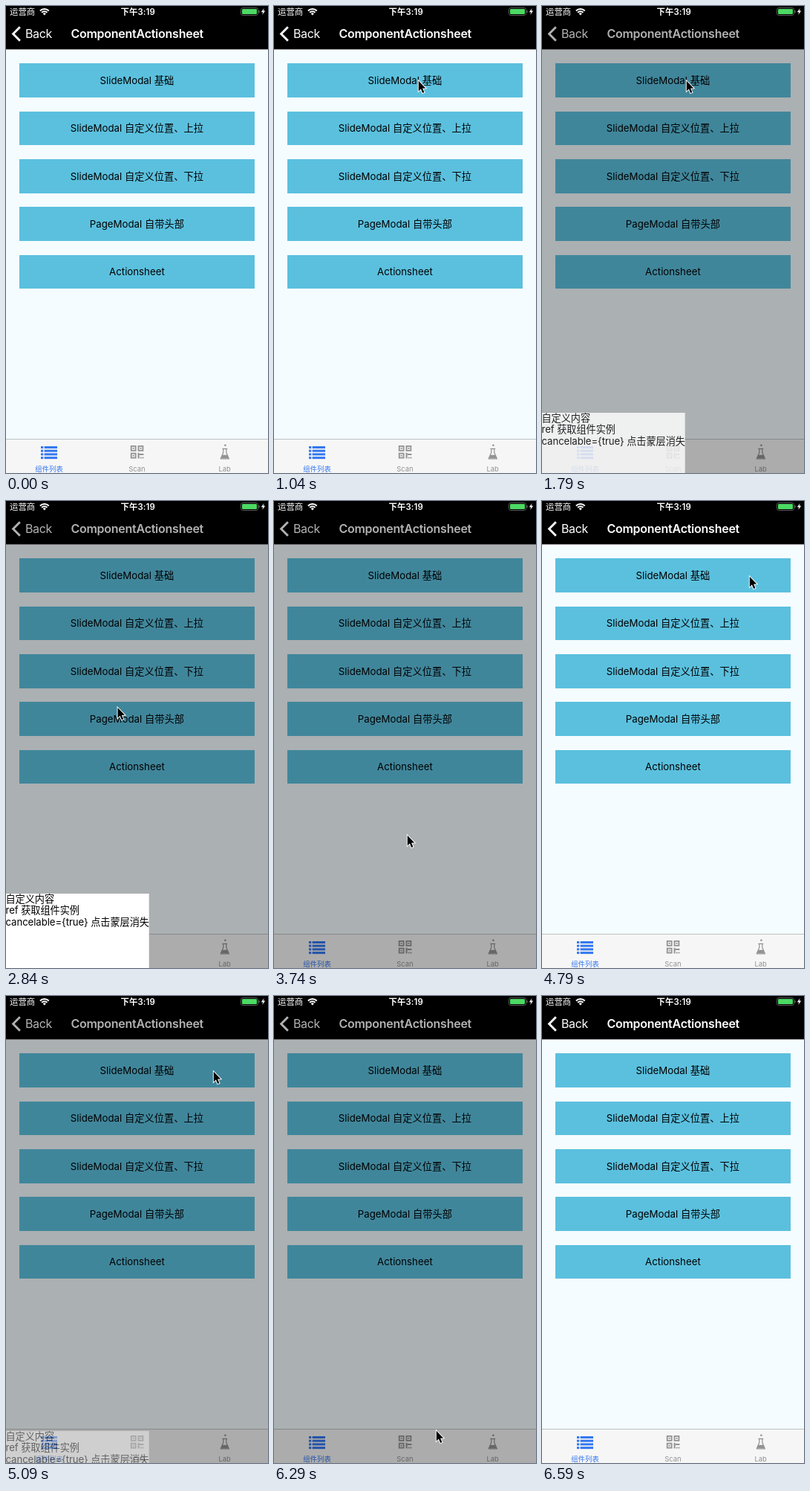
An HTML page with a canvas that plays this animation: 353 px wide and 628 px high, repeating every 7.04 s.

```html
<!DOCTYPE html>
<html lang="zh">
<head>
<meta charset="utf-8">
<title>Action sheet demo</title>
<style>
  html, body { margin: 0; width: 100%; height: 100%; overflow: hidden; background: #000; }
  canvas { display: block; width: 353px; height: 628px; }
</style>
</head>
<body>
<canvas id="stage"></canvas>
<script>
const W = 353, H = 628, LOOP = 7040, STEP = 150;
const SHEET_W = 192.7, SHEET_H = 100;
const FONT = 'Inter, "Noto Sans CJK SC", "Noto Sans CJK", sans-serif';
const ratio = window.devicePixelRatio || 1;

const buttons = [
  'SlideModal 基础',
  'SlideModal 自定义位置、上拉',
  'SlideModal 自定义位置、下拉',
  'PageModal 自带头部',
  'Actionsheet'
];
const sheetLines = ['自定义内容', 'ref 获取组件实例', 'cancelable={true} 点击蒙层消失'];

// Sheet slides in at open and out at close; the backdrop lingers
const sessions = [{ open: 1648, close: 3437 }, { open: 5015, close: 6030 }];
const SLIDE = 175, LINGER = 405;

// Pointer stops, joined by curved moves
const entry = [3, 249], firstTap = [195, 100], dismiss = [180, 449];
const secondTap = [280, 101], lastTap = [219, 584], exit = [300, 640];
const linear = u => u;
const easeOut = u => 1 - (1 - u) ** 2;
const moves = [
  { start: 300, end: 1040, from: entry, bend: [225, 80], to: firstTap, ease: linear },
  { start: 2540, end: 3140, from: firstTap, bend: [114, 280], to: dismiss, ease: linear },
  { start: 3840, end: 4790, from: dismiss, bend: [214, 275], to: secondTap, ease: easeOut },
  { start: 5240, end: 5840, from: secondTap, bend: [275, 400], to: lastTap, ease: easeOut },
  { start: 6290, end: 6590, from: lastTap, bend: [258, 612], to: exit, ease: linear }
];

const clamp = v => Math.max(0, Math.min(1, v));

function surface(el, w, h) {
  el.width = Math.round(w * ratio);
  el.height = Math.round(h * ratio);
  const pen = el.getContext('2d');
  pen.setTransform(ratio, 0, 0, ratio, 0, 0);
  return pen;
}

const stage = surface(document.getElementById('stage'), W, H);
const sheet = surface(document.createElement('canvas'), SHEET_W, SHEET_H);
let ctx = stage;

function rect(x, y, w, h, color) {
  ctx.fillStyle = color;
  ctx.fillRect(x, y, w, h);
}

function text(str, x, y, size, color, { weight = 400, align = 'left', spacing = 0 } = {}) {
  ctx.font = `${weight} ${size}px ${FONT}`;
  ctx.letterSpacing = spacing + 'px';
  ctx.textAlign = align;
  ctx.fillStyle = color;
  ctx.fillText(str, x, y);
}

function trace(points, closed) {
  ctx.beginPath();
  points.forEach(([x, y]) => ctx.lineTo(x, y));
  if (closed) ctx.closePath();
}

function stroke(color, width) {
  ctx.strokeStyle = color;
  ctx.lineWidth = width;
  ctx.stroke();
}

function fill(color) {
  ctx.fillStyle = color;
  ctx.fill();
}

function wifiIcon(cx, cy) {
  const a = -Math.PI * 0.75, b = -Math.PI * 0.25;
  ctx.beginPath();
  ctx.moveTo(cx, cy);
  ctx.arc(cx, cy, 3, a, b);
  fill('#fff');
  for (const r of [5.2, 8.4]) {
    ctx.beginPath();
    ctx.arc(cx, cy, r, a, b);
    stroke('#fff', 1.9);
  }
}

function batteryIcon(x, y) {
  ctx.beginPath();
  ctx.roundRect(x, y, 23, 10, 2.6);
  stroke('#666', 0.9);
  ctx.beginPath();
  ctx.roundRect(x + 1.5, y + 1.5, 20, 7, 1.3);
  fill('#4cd964');
  rect(x + 24, y + 3.3, 1.2, 3.4, '#666');
}

function drawStatus() {
  text('运营商', 5, 12, 11.4, '#fff');
  text('下午3:19', 177.7, 12, 11.4, '#fff', { weight: 600, align: 'center', spacing: 0.1 });
  wifiIcon(51.8, 12.4);
  batteryIcon(316.5, 2.5);
  trace([[347.6, 3], [343.8, 8.2], [346.3, 8.2], [345.2, 12], [349.2, 6.6], [346.7, 6.6]], true);
  fill('#fff');
}

function drawHeader() {
  rect(0, 0, W, 58, '#000');
  rect(0, 58, W, 1, '#a7a7aa');
  ctx.lineJoin = 'miter';
  trace([[18.8, 28.2], [9.6, 37.5], [18.8, 46.8]]);
  stroke('#fff', 2.9);
  text('Back', 26, 43.4, 16, '#fff', { spacing: -0.4 });
  text('ComponentActionsheet', 176.7, 43.4, 16, '#fff',
    { weight: 600, align: 'center', spacing: -0.25 });
}

function drawButtons() {
  buttons.forEach((label, i) => {
    const y = 77.4 + i * 64.32;
    const top = Math.round(y), bottom = Math.round(y + 45.5);
    rect(18, top, 317, bottom - top, '#5bc0de');
    text(label, 176.4, Math.round(y + 27.6), 13.25, '#000', { align: 'center' });
  });
}

function listIcon(x, y, color) {
  for (let i = 0; i < 4; i++) {
    rect(x, y + i * 4.7, 3.2, 3, color);
    rect(x + 4.6, y + i * 4.7, 17.4, 3, color);
  }
}

function scanIcon(x, y, color) {
  for (const [dx, dy] of [[0, 0], [9.8, 0], [0, 9.8]]) {
    ctx.beginPath();
    ctx.rect(x + dx + 0.9, y + dy + 0.9, 5.9, 5.9);
    stroke(color, 1.8);
    rect(x + dx + 2.9, y + dy + 2.9, 1.9, 1.9, color);
  }
  rect(x + 9.8, y + 9.8, 2, 7.6, color);
  rect(x + 11.8, y + 11, 5.8, 2, color);
  for (const dx of [13, 15.8]) rect(x + dx, y + 15.6, 1.8, 1.8, color);
}

function flaskIcon(cx, color) {
  ctx.lineJoin = 'round';
  trace([[cx - 2, 596], [cx - 2, 600.5], [cx - 5.6, 608.8], [cx + 5.6, 608.8],
    [cx + 2, 600.5], [cx + 2, 596]]);
  stroke(color, 1.2);
  trace([[cx - 3.4, 603.8], [cx + 3.4, 603.8], [cx + 5, 608], [cx - 5, 608]], true);
  fill(color);
  rect(cx - 3.4, 594.8, 6.8, 1.3, color);
  ctx.beginPath();
  ctx.arc(cx + 0.6, 590.8, 1.3, 0, Math.PI * 2);
  fill(color);
}

function drawTabs() {
  const blue = '#3478f0', gray = '#929292';
  rect(0, 582, W, 46, '#f6f6f6');
  rect(0, 582, W, 1, '#bdc3c5');
  listIcon(47, 592, blue);
  scanIcon(167.8, 591, gray);
  flaskIcon(294.8, gray);
  const label = (str, x, color) => text(str, x, 626, 9.42, color, { align: 'center' });
  label('组件列表', 58, blue);
  label('Scan', 176.4, gray);
  label('Lab', 294.6, gray);
}

// Painted once so that panel and text fade as one layer
function paintSheet() {
  ctx = sheet;
  rect(0, 0, SHEET_W, SHEET_H, '#fff');
  sheetLines.forEach((line, i) =>
    text(line, -0.5, 11.7 + i * 15.5, 13.18, '#000', { spacing: -0.06 }));
  ctx = stage;
}

function drawSheet(p) {
  ctx.globalAlpha = p;
  ctx.drawImage(sheet.canvas, 0, Math.round(H - SHEET_H * p), SHEET_W, SHEET_H);
  ctx.globalAlpha = 1;
}

function pointerAt(t) {
  const move = moves.findLast(m => t >= m.start);
  if (!move || t >= moves[moves.length - 1].end) return null;
  const u = move.ease(clamp((t - move.start) / (move.end - move.start)));
  const v = 1 - u;
  return move.from.map((a, i) => v * v * a + 2 * u * v * move.bend[i] + u * u * move.to[i]);
}

function drawPointer(pos) {
  if (!pos) return;
  ctx.save();
  ctx.translate(pos[0] - 0.2, pos[1] + 0.8);
  ctx.lineJoin = 'miter';
  trace([[0, 0], [0, 13.6], [3.1, 10.8], [5.4, 16.2], [7.6, 15.2], [5.3, 10], [9.4, 9.7]], true);
  stroke('#fff', 1.9);
  fill('#000');
  ctx.restore();
}

// The screen refreshes in discrete steps
function tickAt(t) {
  const base = t < 890 ? 0 : 890;
  return base + Math.floor((t - base) / STEP) * STEP;
}

function draw(time) {
  const t = tickAt(time % LOOP);
  const live = sessions.find(s => t >= s.open && t < s.close + LINGER);
  rect(0, 0, W, H, '#f5fcff');
  drawHeader();
  drawButtons();
  drawTabs();
  if (live) {
    rect(0, 0, W, H, 'rgba(0,0,0,0.3)');
    drawSheet(Math.min(clamp((t - live.open) / SLIDE), clamp(1 - (t - live.close) / SLIDE)));
  }
  drawStatus();
  drawPointer(pointerAt(t));
}

paintSheet();
const start = performance.now();
function loop() {
  draw(performance.now() - start);
  requestAnimationFrame(loop);
}
loop();
</script>
</body>
</html>
```
